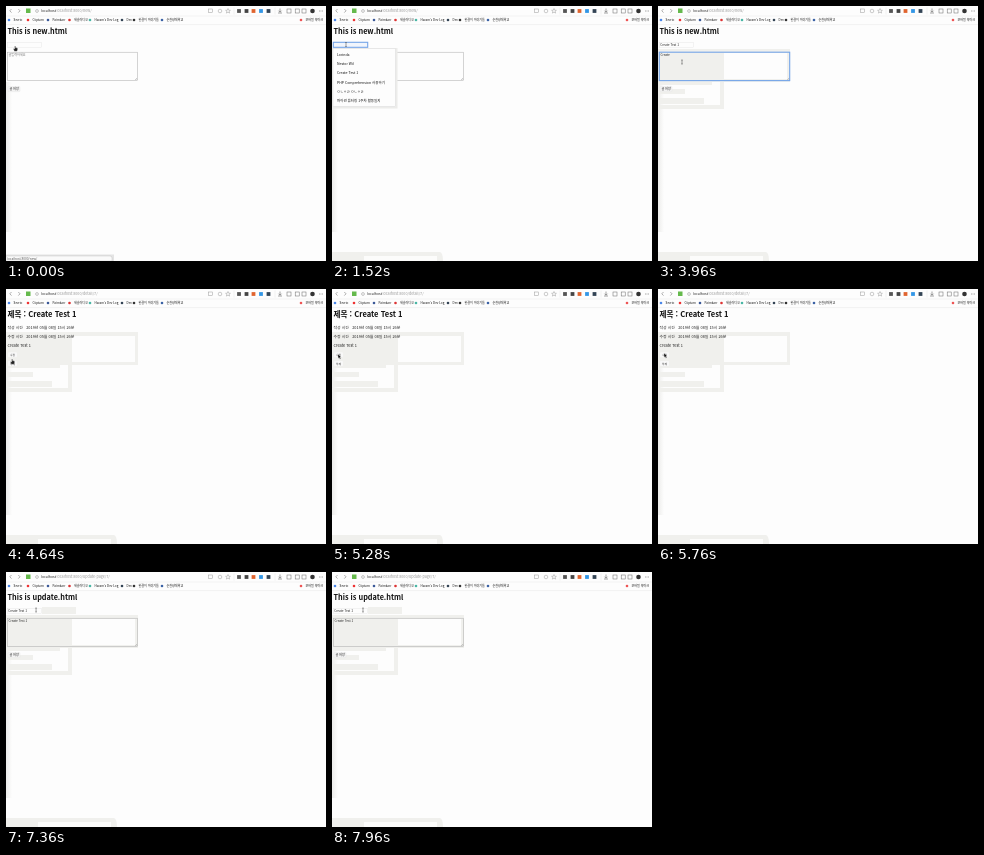
Animation of 320 by 255 pixels, one loop 8000 ms. Source, as an HTML page:

```html
<!DOCTYPE html>
<html lang="ko">
<head>
<meta charset="utf-8">
<title>Form demo</title>
<style>
  html, body { margin: 0; width: 100%; height: 100%; overflow: hidden; background: #fdfdfd; }
  svg { display: block; width: 100%; height: 100%; }
  text { font-family: "Noto Sans CJK KR", "Noto Sans CJK", "Noto Sans", sans-serif; fill: #222; white-space: pre; }
  .h1 { font-size: 7.6px; font-weight: 700; fill: #111; }
  #title { font-size: 7.3px; }
  .body { font-size: 3.9px; }
  .field { font-size: 3.1px; }
  .tiny { font-size: 2.6px; }
  .item { font-size: 3.5px; font-weight: 500; fill: #111; }
  .mark { font-size: 3px; fill: #111; }
  .url { font-size: 3.7px; fill: #999; }
  .host { font-size: 3.5px; fill: #222; }
  .ghost { fill: #f0f0ed; }
</style>
</head>
<body>
<svg id="stage" viewBox="0 0 320 255" preserveAspectRatio="none">
  <defs>
    <linearGradient id="edge"><stop stop-color="#ededeb"/><stop offset="1" stop-color="#fdfdfd"/></linearGradient>
  </defs>
  <rect width="320" height="255" fill="#fdfdfd"/>
  <rect y="76" width="6" height="150" fill="url(#edge)"/>

  <g id="bottomGhost">
    <path class="ghost" d="M0 246H108Q111 247 111 255H0Z"/>
    <rect x="32" y="250" width="73" height="5" fill="#fcfcfb"/>
  </g>
  <g id="pageGhost" class="ghost">
    <path d="M0 43H132V76H66V103H0V99H62V76H0ZM66 47V73H129V47Z" fill-rule="evenodd"/>
    <rect y="74" width="54" height="5"/><rect y="83" width="27" height="5"/><rect y="92" width="46" height="6"/>
    <rect id="inputGhost" x="36" y="35" width="34" height="7"/>
  </g>

  <g id="form">
    <text id="title" class="h1" x="1.5" y="27.5"></text>
    <rect id="input" x="1.3" y="36.3" width="34.4" height="5"/>
    <text id="inputText" class="field" x="2.2" y="40"></text>
    <rect id="area" x="1.3" y="46.2" width="130.4" height="28.4" fill="none"/>
    <path d="M129 74L131 72M130.3 74L131 73.3" stroke="#888" stroke-width=".4"/>
    <text id="areaText" class="field" x="2.5" y="50"></text>
    <rect x="2" y="80.5" width="12" height="5.2" rx="1" fill="#f3f3f3" stroke="#e4e4e4" stroke-width=".4"/>
    <text class="field" x="3.4" y="84.3">글 저장</text>
  </g>

  <g id="detail">
    <text class="h1" x="1.5" y="27.5">제목 : Create Test 1</text>
    <text class="body" x="1.5" y="39.5">작성 시간   2019년 05월 08일 15시 26분</text>
    <text class="body" x="1.5" y="49">수정 시간   2019년 05월 08일 15시 26분</text>
    <text class="body" x="1.5" y="58.2">Create Test 1</text>
    <rect x="2" y="63.2" width="9" height="5" rx="1" fill="#f8f8f8"/>
    <rect x="2" y="72" width="9" height="5" rx="1" fill="#f8f8f8"/>
    <text class="tiny" x="4" y="66.7">수정</text>
    <text class="tiny" x="4" y="75.5">삭제</text>
  </g>

  <g id="menu">
    <rect x="0" y="42" width="65.5" height="60.5" fill="#ececea"/>
    <rect x="1" y="42.4" width="62.5" height="58.2" fill="#fdfdfd" stroke="#dadada" stroke-width=".5"/>
    <rect id="wash" class="ghost" x="1" y="43" width="64" height="32"/>
    <rect id="hover" x="1.2" width="62.6" height="9.3" fill="#e2e3e6"/>
    <g id="items"></g>
  </g>

  <g id="status">
    <rect y="248.5" width="108" height="6.5" fill="#e4e4e4"/>
    <path d="M0 250H104Q106 250 106 252V255H0Z" fill="#fafafa" stroke="#bbb" stroke-width=".4"/>
    <text id="statusText" x="1" y="253.8" style="font-size:3.2px;fill:#555"></text>
  </g>

  <g id="chrome">
    <rect width="320" height="18.5" fill="#fdfdfd"/>
    <path d="M0 10H320M0 18.6H320" stroke="#e6e6e6" stroke-width=".5"/>
    <path d="M5.5 3L3.8 4.8L5.5 6.6M12.3 3L14 4.8L12.3 6.6" fill="none" stroke="#777" stroke-width=".6"/>
    <rect x="20" y="2.5" width="4.5" height="4.5" fill="#65b94c"/>
    <circle cx="31" cy="5" r="1.4" fill="none" stroke="#888" stroke-width=".5"/>
    <text x="35" y="6" class="host">localhost</text>
    <text id="url" x="50.5" y="6" class="url"></text>
    <g fill="none" stroke="#999" stroke-width=".5">
      <rect x="202.5" y="3" width="4" height="3.5"/><circle cx="214" cy="5" r="1.8"/>
      <path d="M222 2.5L222.7 4.2L224.4 4.3L223.1 5.4L223.6 7.1L222 6.1L220.4 7.1L220.9 5.4L219.6 4.3L221.3 4.2Z"/>
      <path d="M228 1.5V8.5M269 1.5V8.5" stroke="#e4e4e4"/>
      <path d="M274 2.5V6M272.5 4.7L274 6.2L275.5 4.7M272 7H276" stroke="#444"/>
      <rect x="281" y="3" width="4" height="4" stroke="#666"/>
      <rect x="289.2" y="3" width="4" height="4" stroke="#666"/>
      <rect x="296" y="3" width="4" height="4" stroke="#666"/>
    </g>
    <g id="icons"></g>
    <g id="marks"></g>
  </g>

  <g id="cursor">
    <path id="arrow" d="M0 0V4.4L1.1 3.5L1.9 5.2L2.8 4.8L2 3.2H3.3Z" fill="#111" stroke="#fff" stroke-width=".35"/>
    <path id="beam" d="M-.8 -2H.8M0 -2V2M-.8 2H.8" fill="none" stroke="#444" stroke-width=".5"/>
    <path id="hand" d="M-.3 0H.6V1.6L2.6 2.1V4L1.8 5.3H-.6L-1.7 3L-1 2.6L-.3 3Z" fill="#222" stroke="#fff" stroke-width=".3"/>
  </g>
</svg>
<script>
const LOOP = 8000;
const TIMES = { statusOff: 240, focus: 880, menuOpen: 1120, menuSwept: 2640, menuClose: 3520, typing: 3680,
  submit: 4320, detail: 4400, detailReady: 4560, update: 5880 };
const MENU = ["Lorinda", "Nestor Wil", "Create Test 1", "PHP Comprehension 사용하기",
  "ㅁㄴㅇㄹ ㅁㄴㅇㄹ", "파이썬 튜터링 1주차 활동일지"];
const MARKS = [[3, "#4a86e8", "Sevrio"], [22, "#e33", "Cliptarn"], [42, "#3b5998", "Palmkarr"],
  [63.5, "#d33", "새솔라디오"], [84, "#49b6a5", "Haram's Dev Log"], [116, "#345", "Dev"],
  [128, "#333", "한결이 이야기들"], [156, "#3b62a5", "순천향대학교"], [295, "#e55", "모바일 북마크"]];
const ICONS = [[233, "#555"], [240.5, "#444"], [247.5, "#e0642f"], [255, "#3296e6"], [262.5, "#345"]];

// time, x, y, pointer shape
const PATH = [[0, 9, 40, "hand"], [240, 10, 39, "beam"], [840, 14, 38.5, "beam"], [1760, 14, 38.5, "beam"],
  [1920, 17, 48, "arrow"], [2160, 19, 72, "arrow"], [2360, 20, 89, "arrow"], [2560, 19, 80, "arrow"],
  [2760, 18, 69, "arrow"], [3520, 18, 69, "arrow"], [3660, 24, 56, "beam"], [4140, 24, 56, "beam"],
  [4300, 8, 82, "arrow"], [4400, 8, 80, "arrow"], [4640, 6, 70, "hand"], [5080, 6, 69, "hand"],
  [5360, 6, 64, "arrow"], [5880, 6, 64, "arrow"], [6120, 12, 60, "arrow"], [6440, 29, 49, "arrow"],
  [6640, 33, 43.5, "arrow"], [6880, 33, 40, "beam"], [7240, 30, 38, "beam"], [8000, 31, 38, "beam"]];

const $ = id => document.getElementById(id);
const show = (id, on) => $(id).style.display = on ? "" : "none";
const setText = (id, value) => { if ($(id).textContent !== value) $(id).textContent = value; };

function add(parent, tag, attrs, text = "") {
  const node = document.createElementNS("http://www.w3.org/2000/svg", tag);
  for (const key in attrs) node.setAttribute(key, attrs[key]);
  node.textContent = text;
  $(parent).append(node);
}

MENU.forEach((label, i) => add("items", "text", { x: 5, y: 49.6 + i * 9.3, class: "item" }, label));
MARKS.forEach(([x, fill, label]) => {
  add("marks", "circle", { cx: x, cy: 14, r: 1.3, fill });
  add("marks", "text", { x: x + 4.6, y: 15.2, class: "mark" }, label);
});
ICONS.forEach(([x, fill]) => add("icons", "rect", { x: x - 1.9, y: 3.1, width: 3.8, height: 3.8, fill }));
add("icons", "circle", { cx: 306.5, cy: 5, r: 2.3, fill: "#333" });
add("icons", "path", { d: "M313 5H317", stroke: "#777", "stroke-width": .8, "stroke-dasharray": ".8 .8" });

function pointerAt(t) {
  const i = PATH.findLastIndex(step => step[0] <= t);
  const a = PATH[i], b = PATH[i + 1] || a;
  const k = b === a ? 0 : (t - a[0]) / (b[0] - a[0]);
  const ease = k * k * (3 - 2 * k);
  return { x: a[1] + (b[1] - a[1]) * ease, y: a[2] + (b[2] - a[2]) * ease, kind: k > .6 ? b[3] : a[3] };
}

function outline(id, color, width) {
  $(id).setAttribute("stroke", color);
  $(id).setAttribute("stroke-width", width);
}

function render(t) {
  const T = TIMES;
  const p = pointerAt(t);
  const page = t < T.detail ? "new" : t < T.update ? "detail" : "update";
  const menu = t >= T.menuOpen && t < T.menuClose;
  const row = menu && p.y > 43 ? Math.min(5, Math.floor((p.y - 43.5) / 9.3)) : -1;
  const loading = t >= T.submit && t < T.detailReady;

  show("form", page !== "detail");
  show("detail", page === "detail");
  show("menu", menu);
  show("wash", t >= T.menuSwept);
  show("pageGhost", t >= T.menuClose);
  show("inputGhost", page === "update");
  show("bottomGhost", t >= T.statusOff);
  show("status", t < T.statusOff || loading);
  setText("statusText", loading ? "localhost의 응답을 기다리는 중..." : "localhost:8000/new/");
  setText("url", "localhost:8000/" + { new: "new/", detail: "detail/7/", update: "update-page/7/" }[page]);
  setText("title", `This is ${page}.html`);

  const typed = Math.max(0, Math.floor((t - T.typing) / 36));
  const picked = t >= T.menuClose || page === "update";
  setText("inputText", picked ? MENU[2] : row >= 0 ? MENU[row] : "");
  setText("areaText", page === "update" ? MENU[2]
    : t >= T.typing ? MENU[2].slice(0, typed) : menu ? "" : "글입력하세요");
  $("areaText").style.fill = t < T.typing ? "#777" : "#222";

  const inputFocus = t >= T.focus && t < T.typing;
  const areaFocus = t >= T.typing && t < T.submit;
  outline("input", inputFocus ? "#75a5e8" : "#e2e2e2", inputFocus ? 1.1 : .4);
  outline("area", areaFocus ? "#75a5e8" : "#aaa", areaFocus ? 1.1 : .5);
  $("input").setAttribute("fill", row >= 0 ? "#dfe7f6" : inputFocus ? "#f1f5fc" : "#fdfdfd");

  show("hover", row >= 0);
  $("hover").setAttribute("y", 43.7 + 9.3 * Math.max(0, row));
  $("cursor").setAttribute("transform", `translate(${p.x} ${p.y})`);
  for (const kind of ["arrow", "beam", "hand"]) show(kind, p.kind === kind);
}

const start = performance.now();
function tick() {
  const t = (performance.now() - start) % LOOP;
  render(Math.floor(t / 40) * 40);
  requestAnimationFrame(tick);
}
tick();
</script>
</body>
</html>
```
